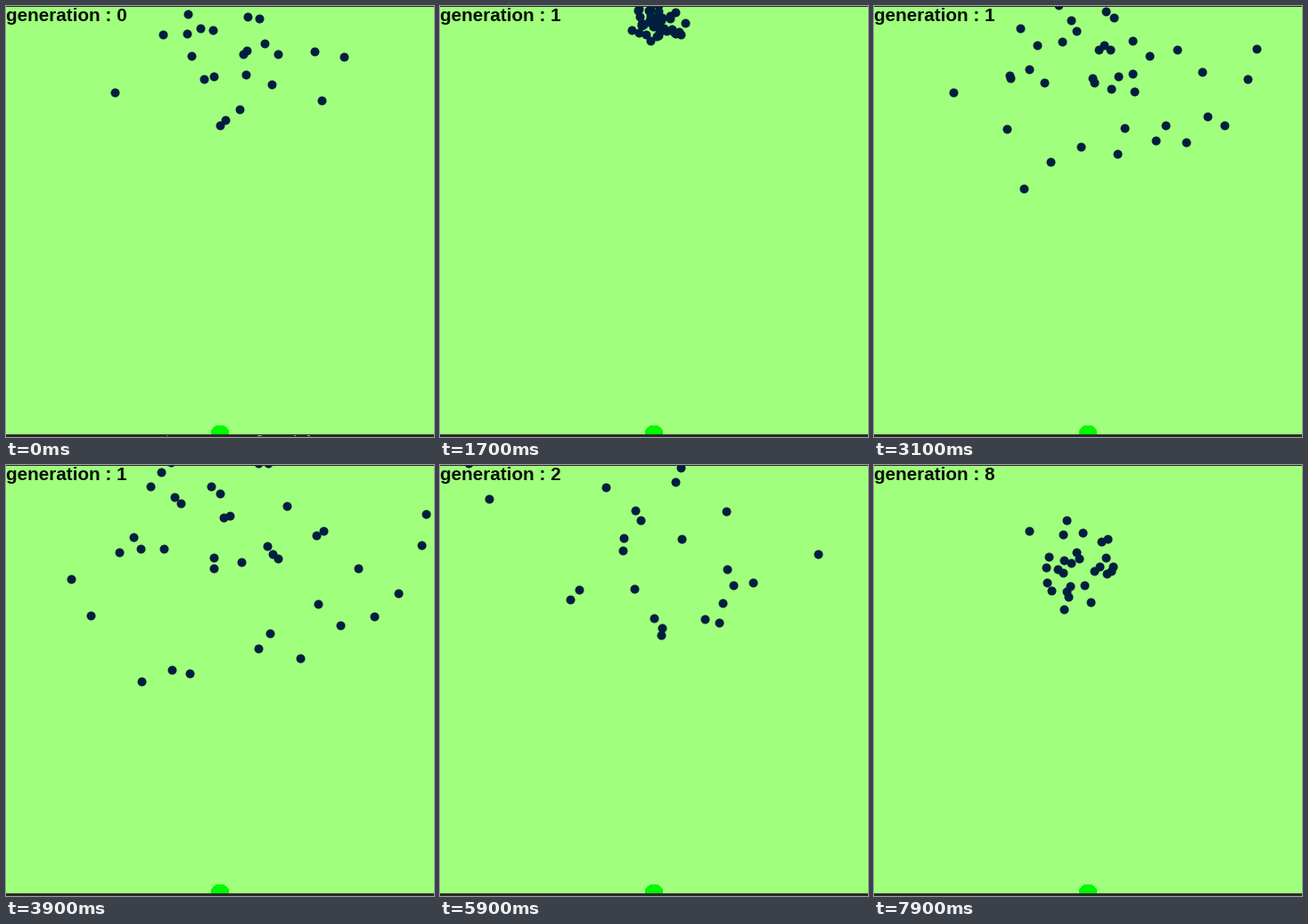
Animation of 480 by 484 pixels, one loop 8 s. Source, as a matplotlib script:

```python
import matplotlib.pyplot as plt
import numpy as np
from matplotlib.animation import FuncAnimation
from matplotlib.patches import Circle, Rectangle

W, H, DPI = 480, 484, 100
FRAMES, STEP = 80, 100
START = np.array([240.0, 10.0])
STEPS, DRAG, KICK = 30, 0.95, 0.8
GRASS, NAVY, LIME, FRAME = "#a0ff7d", "#001f3f", "#00fa00", "#2b2b2b"


def px(size):
    """Pixels to points."""
    return size * 72 / DPI


class Swarm:
    """Dots that burst from the start, wander and slow down."""

    def __init__(self, number, shown, born, count, drift, spread, life):
        self.number, self.shown, self.born = number, shown, born
        rng = np.random.default_rng(40 + number)
        z = rng.normal(size=(count, 2))
        z = (z - z.mean(axis=0)) / z.std(axis=0)
        vel = np.array(drift) + np.array(spread) * z
        pos = np.tile(START, (count, 1))
        self.path = [pos]
        for _ in range(STEPS):
            pos = pos + vel
            vel = DRAG * vel + rng.normal(0, KICK, vel.shape)
            self.path.append(pos)
        self.life = rng.uniform(*life, count)

    def at(self, t):
        age = max(t - self.born, 0)
        return np.round(self.path[age][self.life > age])


SWARMS = [
    Swarm(0, 0, -12, 24, drift=(1.8, 4.8), spread=(5.8, 3.6), life=(20, 30)),
    Swarm(1, 15, 15, 46, drift=(1.4, 4.8), spread=(7.0, 5.0), life=(28, 30)),
    Swarm(2, 42, 43, 46, drift=(-0.3, 8.0), spread=(6.5, 4.5), life=(9, 25)),
    Swarm(8, 70, 70, 28, drift=(-1.8, 14.3), spread=(3.2, 3.0), life=(28, 30)),
]

fig = plt.figure(figsize=(W / DPI, H / DPI), dpi=DPI, facecolor=GRASS)
ax = fig.add_axes([0, 0, 1, 1])
ax.set(xlim=(0, W), ylim=(H, 0))
ax.axis("off")

ax.add_patch(Circle((240, 481), 10, fc=LIME, lw=0, aa=False, zorder=1))
dots = ax.scatter([], [], s=px(10) ** 2, c=NAVY, lw=0,
                  antialiased=False, zorder=2)
label = ax.text(0, 17, "", family="Liberation Sans", weight="bold",
                size=px(20.7), color="#061006", va="baseline", zorder=3)
for y, h in ((0, 1), (481, 3)):
    ax.add_patch(Rectangle((0, y), W, h, fc=FRAME, lw=0, zorder=4))
specks = [ax.add_patch(Rectangle((x, 482), w, 1, fc="#b0b0b0", lw=0, zorder=5))
          for x, w in ((180, 1), (282, 5), (323, 2), (338, 3))]


def draw(t):
    swarm = [s for s in SWARMS if s.shown <= t][-1]
    dots.set_offsets(swarm.at(t))
    label.set_text(f"generation : {swarm.number}")
    for s in specks:
        s.set_visible(swarm.number == 0)
    return dots, label, *specks


anim = FuncAnimation(fig, draw, frames=FRAMES, interval=STEP,
                     repeat=True, repeat_delay=0, blit=False)
plt.show()
```
